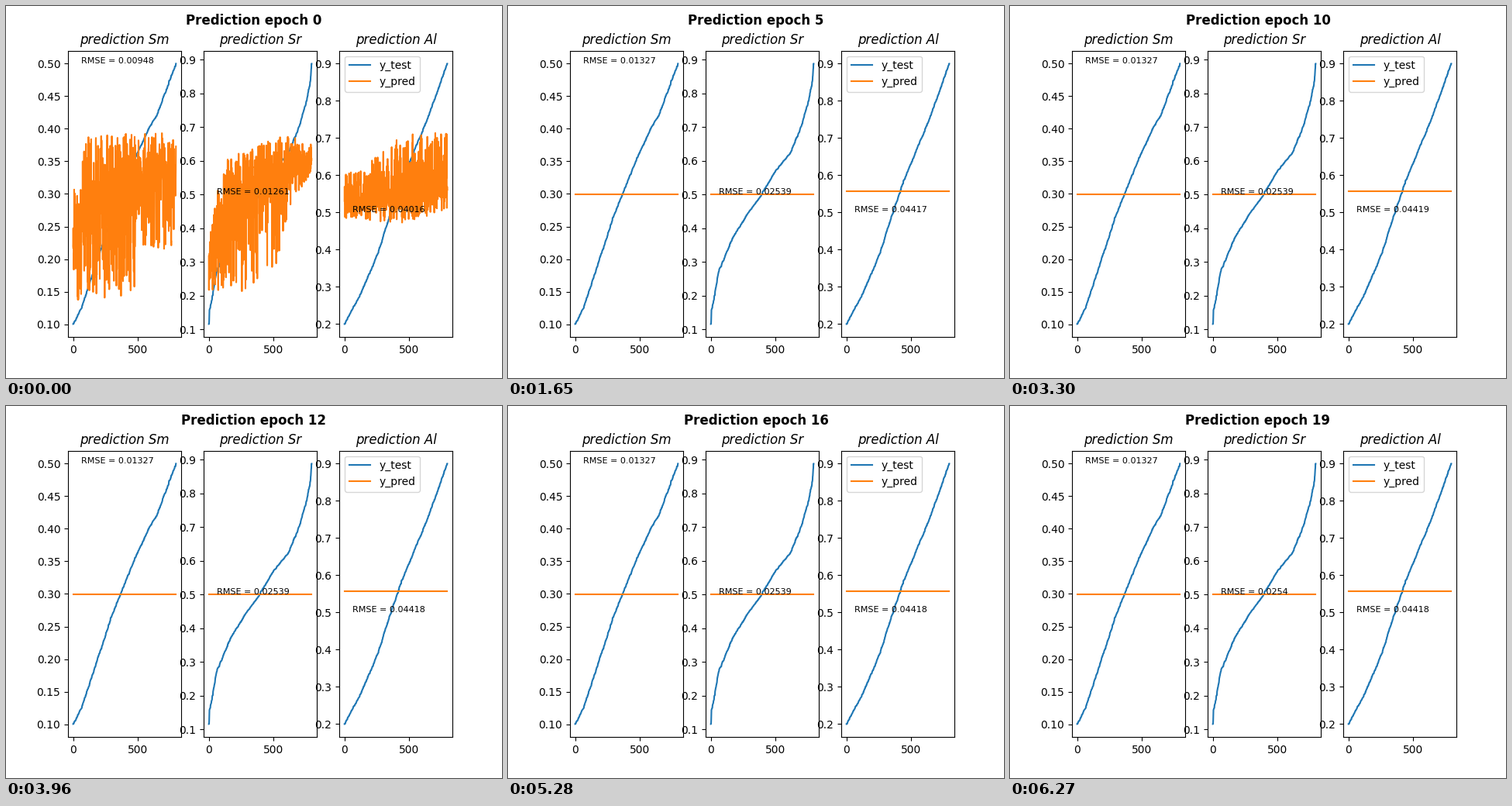
A matplotlib script for the animation above (6600 ms loop, 640 by 480 pixels).

```python
import matplotlib.pyplot as plt
import numpy as np
from matplotlib.animation import FuncAnimation

N = 800
EPOCHS = 20
INTERVAL = 330
IDX = np.arange(N)

# Key points (index, value): test is the sorted curve; lo, mid and hi bound
# the noise of the first epoch. mean is the constant of all later epochs.
PANELS = [
    dict(
        name="Sm", mean=.2993,
        test=[(0, .1002), (65, .125), (110, .152), (300, .266),
              (480, .355), (600, .405), (650, .42), (799, .5)],
        lo=[(0, .135), (480, .14), (490, .22), (799, .21)],
        mid=[(0, .23), (330, .315), (799, .335)],
        hi=[(0, .345), (120, .39), (799, .395)],
    ),
    dict(
        name="Sr", mean=.5,
        test=[(0, .1153), (8, .157), (60, .27), (170, .371), (300, .45),
              (380, .491), (502, .569), (616, .622), (700, .697),
              (760, .777), (793, .84), (799, .888)],
        lo=[(0, .21), (250, .2), (600, .32), (680, .5), (799, .555)],
        mid=[(0, .28), (150, .45), (450, .57), (799, .6)],
        hi=[(0, .36), (60, .52), (150, .61), (600, .68), (799, .65)],
    ),
    dict(
        name="Al", mean=.557,
        test=[(0, .2), (128, .282), (261, .391), (363, .502),
              (436, .576), (502, .632), (650, .756), (799, .9)],
        lo=[(0, .485), (450, .47), (799, .505)],
        mid=[(0, .53), (799, .57)],
        hi=[(0, .6), (250, .66), (450, .715), (799, .715)],
    ),
]

RMSE = [
    [.00948] + [.01327] * 19,
    [.01261] + [.02539] * 18 + [.0254],
    [.04016] + [.0441 + int(d) / 1e5 for d in "9778787899888888898"],
]


def along(points, pos=IDX):
    return np.interp(pos, *zip(*points))


def sorted_targets(points, rng):
    """Follow the key points in the uneven steps of sorted samples."""
    pos = np.sort(IDX + rng.normal(0, 4, N)).clip(0, N - 1)
    pos[[0, -1]] = 0, N - 1
    return along(points, pos)


def noisy_output(panel, rng):
    """Dense around mid, with sparse spikes towards lo and hi."""
    lo, mid, hi = (along(panel[key]) for key in ("lo", "mid", "hi"))
    u = rng.random(N)
    up = (hi - mid) * u ** 2
    down = (lo - mid) * u ** 2.5
    return mid + np.where(rng.random(N) < 0.5, up, down)


rng = np.random.default_rng(7)
fig, axes = plt.subplots(1, 3, figsize=(6.4, 4.8), dpi=100)
heading = fig.suptitle("", fontweight="bold")

lines, labels, first = [], [], []
for ax, panel in zip(axes, PANELS):
    ax.set_title(f"prediction {panel['name']}", style="italic")
    ax.plot(IDX, sorted_targets(panel["test"], rng), label="y_test")
    first.append(noisy_output(panel, rng))
    lines.append(ax.plot(IDX, first[-1], label="y_pred")[0])
    labels.append(ax.text(60, 0.5, "", fontsize=8))
axes[-1].legend(loc="upper left")


def update(epoch):
    heading.set_text(f"Prediction epoch {epoch}")
    for k, panel in enumerate(PANELS):
        flat = np.full(N, panel["mean"])
        lines[k].set_ydata(flat if epoch else first[k])
        labels[k].set_text(f"RMSE = {round(RMSE[k][epoch], 5)}")
    return [heading, *lines, *labels]


anim = FuncAnimation(fig, update, frames=EPOCHS, interval=INTERVAL,
                     repeat=True, repeat_delay=0)
plt.show()
```
